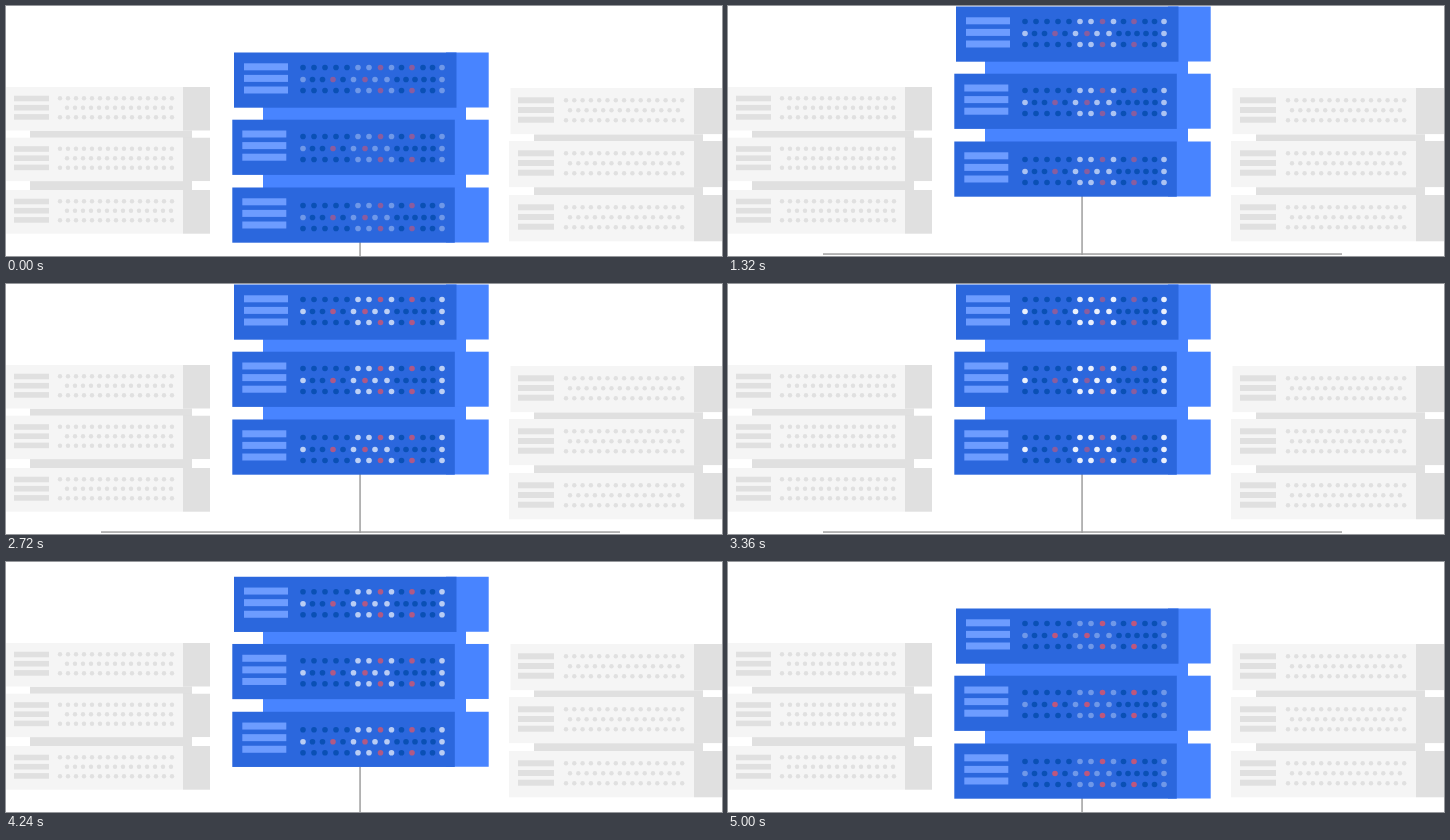
Animation of 716 by 250 pixels, one loop 5040 ms. Source, as an HTML page with a canvas:

```html
<!DOCTYPE html>
<html lang="en">
<head>
<meta charset="utf-8">
<title>Server racks</title>
<style>
  html, body { margin: 0; overflow: hidden; background: #fff; }
  canvas { display: block; }
</style>
</head>
<body>
<canvas id="stage" width="716" height="250"></canvas>
<script>
const ctx = document.getElementById('stage').getContext('2d');
const LOOP = 5040, TRAVEL = 650, DROP_START = 3990, DEPTH = 46;
const GREY = '#e0e0e0', PALE = '#f5f5f5';
const FRONT = '#2b67dd', SIDE = '#4884ff', BAR = '#6d9cff', DARK = '#0a50b5';

// d = dark, w = white, r = red
const OUTER_X = [297, 308, 319, 330, 341, 352, 363, 374.5, 385.5, 395.5, 406, 417, 426.5, 436];
const INNER_X = [297, 306.5, 316.5, 327, 337, 347.5, 359, 369, 381, 391, 400, 409, 418, 427, 436];
const LIGHTS = [
  [15.5, OUTER_X, 'dddddwwrwdrddw'],
  [27.5, INNER_X, 'wddrdwrwwdddddw'],
  [38.5, OUTER_X, 'dddddwwrwdrddw'],
];

function box(x1, y1, x2, y2, color) {
  ctx.fillStyle = color;
  ctx.fillRect(x1, y1, x2 - x1, y2 - y1);
}

function dot(x, y, r, color) {
  ctx.fillStyle = color;
  ctx.beginPath();
  ctx.arc(x, y, r, 0, 2 * Math.PI);
  ctx.fill();
}

function bars(x1, x2, y, step, height, color) {
  for (let i = 0; i < 3; i++) box(x1, y + i * step, x2, y + i * step + height, color);
}

// CSS ease-in-out, solved by bisection
function easeInOut(p) {
  if (p <= 0 || p >= 1) return Math.min(1, Math.max(0, p));
  let lo = 0, hi = 1;
  for (let i = 0; i < 20; i++) {
    const s = (lo + hi) / 2;
    const x = 3 * s * (1 - s) * (1 - s) * 0.42 + 3 * s * s * (1 - s) * 0.58 + s ** 3;
    if (x < p) lo = s; else hi = s;
  }
  return lo * lo * (3 - 2 * lo);
}

function greyRack({ tops, height, left, front, right, band, bars: bar, dots }) {
  box(band[0], tops[0] + height, band[1], tops[2], GREY);
  tops.forEach((top, i) => {
    box(left[i], top, front, top + height, PALE);
    box(front, top, right, top + height, GREY);
    bars(bar[0], bar[1], top + bar[2], bar[3], bar[4], GREY);
    for (let row = 0; row < 3; row++) {
      const inner = row === 1;
      for (let k = 0; k < (inner ? 14 : 15); k++) {
        const x = (inner ? dots.inner : dots.x) + k * dots.step;
        dot(x, top + dots.y + row * dots.rowStep, 2.2, GREY);
      }
    }
  });
  // The pale fronts leave a gap above and below each connector
  for (let i = 0; i < 2; i++) {
    const y1 = tops[i] + height, y2 = tops[i + 1];
    box(left[i + 1], y1, band[0], y2, '#fff');
    box(band[1], y1, right, y2, '#fff');
  }
}

const LEFT_RACK = {
  tops: [81, 131.5, 184], height: 43.7, left: [0, 0, 0], front: 177, right: 204,
  band: [24, 186], bars: [8, 43, 8.7, 9.2, 5.6],
  dots: { x: 54, inner: 61, step: 8, y: 11.3, rowStep: 9.5 },
};
const RIGHT_RACK = {
  tops: [82, 135, 189], height: 46.3, left: [504.5, 503, 503], front: 688, right: 716,
  band: [528, 697], bars: [512, 548, 9.3, 9.7, 6],
  dots: { x: 560, inner: 564, step: 8.3, y: 12.3, rowStep: 10 },
};

function blueRack(white, red) {
  const colors = {
    d: DARK,
    w: `rgba(255,255,255,${0.32 + 0.68 * white})`,
    r: `rgba(238,82,92,${0.4 + 0.6 * red})`,
  };
  box(353.3, 190, 354.8, 249, '#9e9e9e');
  box(95, 247.3, 614, 248.8, '#9e9e9e');
  box(257, 50, 460, 140, SIDE);
  [0.5, 67.7, 135.5].forEach((top, i) => {
    const shift = i ? -1.7 : 0;
    box(440, top, 482.7, top + 55, SIDE);
    box(228 + shift, top, 450.5 + shift, top + 55.2, FRONT);
    bars(238 + shift, 282 + shift, top + 10.8, 11.6, 7, BAR);
    for (const [y, xs, kinds] of LIGHTS) {
      xs.forEach((x, k) => dot(x, y + 69 * i, 2.8, colors[kinds[k]]));
    }
  });
}

function draw(now) {
  const t = now % LOOP;
  const raised = easeInOut(t / TRAVEL) - easeInOut((t - DROP_START) / TRAVEL);
  // White and red lights pulse in turn; the glow builds up, then fades
  const glow = Math.min(1, 0.15 + t / 3200) - Math.max(0, t - 4500) * 0.0008;
  const wave = 0.5 - 0.5 * Math.cos(2 * Math.PI * (t + 15) / 1000);

  box(0, 0, 716, 250, '#fff');
  greyRack(LEFT_RACK);
  greyRack(RIGHT_RACK);
  ctx.save();
  ctx.translate(0, DEPTH * (1 - raised));
  blueRack(wave * glow, (1 - wave) * glow);
  ctx.restore();
}

function frame() {
  draw(performance.now());
  requestAnimationFrame(frame);
}
frame();
</script>
</body>
</html>
```
